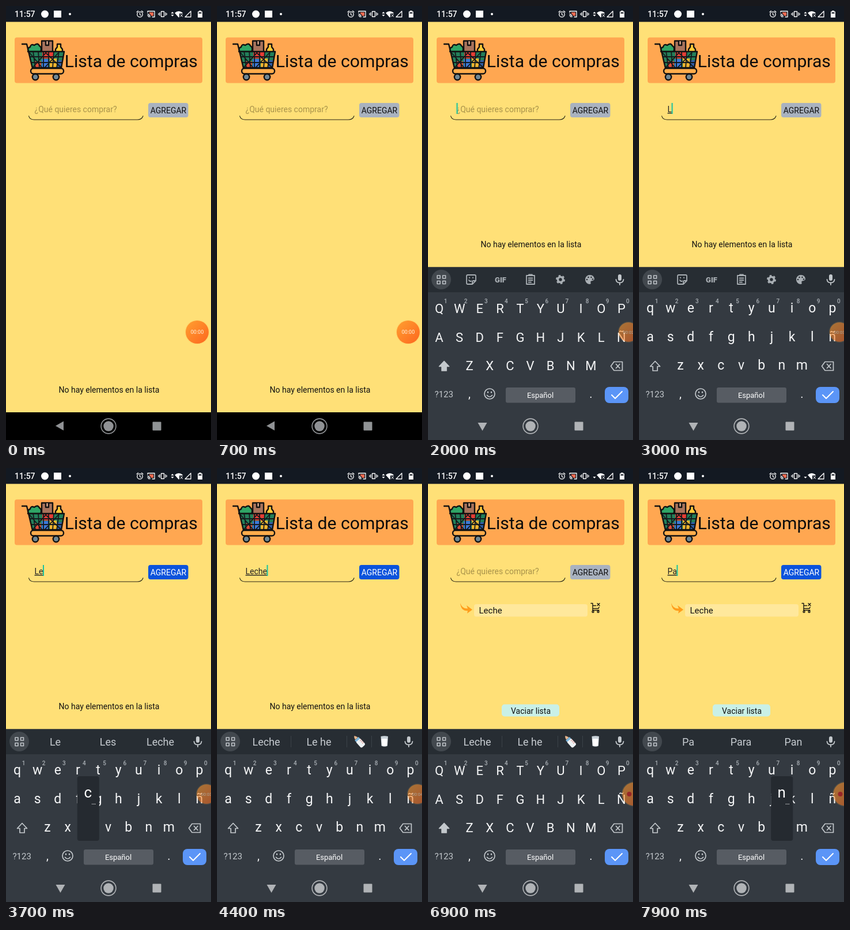
Animation, 356 px wide and 752 px high, one loop 8 s. Source, as an HTML page:

```html
<!DOCTYPE html>
<html lang="es">
<head>
<meta charset="utf-8">
<title>Lista de compras</title>
<style>
html, body { margin: 0; width: 100%; height: 100%; overflow: hidden; background: #ffe077; }
svg { display: block; width: 356px; height: 752px; }
text { font-family: Roboto, Arial, sans-serif; }
.mid { text-anchor: middle; }
.line { fill: none; stroke-linecap: round; stroke-linejoin: round; }
</style>
</head>
<body>
<svg id="stage" viewBox="0 0 356 752" xmlns="http://www.w3.org/2000/svg">
  <defs>
    <linearGradient id="orange" x2="1" y2="1">
      <stop offset="0" stop-color="#ffa030"/><stop offset="1" stop-color="#fd661f"/>
    </linearGradient>
    <clipPath id="basket"><path d="M39 79H101L96 107H46Z"/></clipPath>
  </defs>
  <rect width="356" height="752" fill="#ffe077"/>

  <!-- status bar -->
  <rect width="356" height="27.500" fill="#131922"/>
  <g fill="#fff">
    <text x="15" y="19" font-size="14" font-weight="500">11:57</text>
    <circle cx="67.500" cy="14" r="6.500"/>
    <rect x="83" y="8" width="13" height="12"/>
    <circle cx="111" cy="14" r="2"/>
    <g class="line" stroke="#fff" stroke-width="1.300">
      <circle cx="232.500" cy="14.500" r="4.700"/>
      <path d="M232.500 12V15L234.500 16M227 10.500L229.500 8.500M238 10.500L235.500 8.500"/>
      <path d="M246 11V9H258V19H254M246 14Q250 15 250 19M246 16.500Q248 17 248 19"/>
      <path d="M269.500 9.500H274.500V18.500H269.500ZM267 11.500V16.500M277 11.500V16.500M265 13V15M279 13V15"/>
      <path d="M311 19H321V9Z"/>
    </g>
    <path d="M249 11H256V17H252Q251 14 249 13Z" fill="#f06a50"/>
    <path id="up" d="M286.500 13L289 10L291.500 13Z"/>
    <path d="M286.500 15L289 18L291.500 15Z"/>
    <path d="M293 12Q300 6 307 12L300 20Z"/>
    <path d="M301 13H307V20H301Z" fill="#131922"/>
    <path class="line" d="M303 14.500L306.500 18.500M306.500 14.500L303 18.500" stroke="#fff"/>
    <path d="M335 8H339V9.500H341V20H333V9.500H335Z"/>
    <path d="M334.500 11H339.500V13H334.500Z" fill="#131922"/>
  </g>

  <!-- header -->
  <rect x="15" y="54.500" width="326" height="79" rx="4" fill="#ffa751"/>
  <g stroke="#111" stroke-width="2.400" stroke-linejoin="round">
    <path d="M39 79Q36 73 42 71Q43 65 49 68Q55 63 58 69Q63 72 60 79Z" fill="#2fa566"/>
    <rect x="62" y="60.500" width="19" height="20" fill="#a9735c"/>
    <path d="M69 61V68H74V61" fill="#d9a88c"/>
    <path d="M86 80V75L89 71V66H95V71L98 75V80Z" fill="#ffcb38"/>
    <g clip-path="url(#basket)" stroke-width="0">
      <rect x="38" y="78" width="64" height="30" fill="#237f5a"/>
      <path d="M63 78H82V91H63Z" fill="#e53d35"/>
      <path d="M62 92H75V108H62Z" fill="#3d78d8"/>
      <path d="M76 91H88V108H76Z" fill="#efb430"/>
      <path d="M50 96H61V108H50Z" fill="#df4c39"/>
      <path d="M88 94H100V108H88Z" fill="#315fa8"/>
      <path d="M38 88H102M40 98H100M47 78L51 108M56 78L58 108M65 78V108M74 78V108M83 78L81 108M92 78L88 108M45 108L72 78M66 108L92 80M40 80L62 106M68 80L96 107" fill="none" stroke="#141a1c" stroke-width="1.800"/>
    </g>
    <path class="line" d="M28 66H36L46 108M38 79H101L96 107H46"/>
    <rect x="43" y="108" width="57" height="9.500" rx="4.500" fill="#ffad4c"/>
    <circle cx="51" cy="123" r="5.200" fill="#6f8794"/>
    <circle cx="87" cy="123" r="5.200" fill="#6f8794"/>
  </g>
  <text x="101.700" y="106" font-size="30.150" fill="#0b0b0b">Lista de compras</text>

  <!-- form -->
  <path class="line" d="M39.500 190.500Q41 197 49 197H228Q236 197 238 190.500" stroke="#2a2616" stroke-width="1.100"/>
  <text id="hint" x="49.500" y="184" font-size="14" fill="#a8924a">¿Qué quieres comprar?</text>
  <text id="input" x="49.500" y="184" font-size="14" fill="#222" text-decoration="underline"></text>
  <rect id="caret" y="168" width="2" height="19" fill="#19c2a0"/>
  <rect id="add" x="247" y="168" width="69.500" height="25" rx="4"/>
  <text id="addText" class="mid" x="282" y="186" font-size="14">AGREGAR</text>

  <!-- list -->
  <text id="empty" class="mid" x="179" font-size="14" fill="#111">No hay elementos en la lista</text>
  <g id="list">
    <rect x="80" y="236" width="197" height="21.500" rx="4" fill="#ffe89c"/>
    <text x="88.500" y="251.500" font-size="15" fill="#111">Leche</text>
    <path d="M56 234Q59 244 69 243.500L67 238L77 245.500L68 252L69 247.500Q57 248 56 234Z" fill="#ff9d1c"/>
    <g class="line" stroke="#1c1a12" stroke-width="1.400">
      <path d="M283 234.500H286V246.500H297M286 238.500H291.500M286.500 243.500H296L297 241M294 234.500L298 238.500M298 234.500L294 238.500"/>
      <circle cx="286.500" cy="249" r="1.500"/><circle cx="295.500" cy="249" r="1.500"/>
    </g>
    <rect x="128" y="409.500" width="100" height="21" rx="5" fill="#c9f0e7"/>
    <text class="mid" x="178.500" y="425.500" font-size="14" fill="#111">Vaciar lista</text>
  </g>

  <!-- keyboard -->
  <g id="board">
    <rect y="452.500" width="356" height="300" fill="#343a41"/>
    <rect y="452.500" width="356" height="43.500" fill="#272d33"/>
    <circle cx="23" cy="474" r="17" fill="#42484e"/>
    <g class="line" stroke="#bfc4c9" stroke-width="1.600">
      <path d="M16 467H21V472H16ZM25.500 467H30.500V472H25.500ZM16 476.500H21V481.500H16ZM25.500 476.500H30.500V481.500H25.500Z"/>
    </g>
    <g id="tools">
      <g class="line" stroke="#a9afb4" stroke-width="1.800">
        <path d="M69 466H81Q83 466 83 468V476L77 482H69Q67 482 67 480V468Q67 466 69 466ZM83 476H79Q77 476 77 478V482M71 475Q73 478 75 476.500M72 470.500V471M78 470.500V471"/>
        <path d="M171 467H185V482H171ZM175 467V465.500H181V467M174.500 471.500H181.500M174.500 475H181.500M174.500 478.500H179"/>
        <circle cx="230" cy="474" r="4.500" stroke-width="3.600"/>
        <circle cx="230" cy="474" r="6.600" stroke-width="2.800" stroke-linecap="butt" stroke-dasharray="3.456"/>
      </g>
      <text class="mid" x="126" y="479" font-size="13" font-weight="900" fill="#a9afb4">GIF</text>
      <path d="M281 466A8 8 0 1 0 281 482Q284 481 282 478Q283 476 286 476Q289 475 289 473Q288 466 281 466Z" fill="#a9afb4"/>
      <g fill="#272d33"><circle cx="276" cy="474" r="1.300"/><circle cx="278.500" cy="470" r="1.300"/><circle cx="283.500" cy="470" r="1.300"/><circle cx="286" cy="473.500" r="1.300"/></g>
    </g>
    <g id="words" font-size="18" fill="#c6cbd0">
      <text class="mid" x="85.500" y="481"></text><text class="mid" x="177" y="481"></text><text class="mid" x="268" y="481"></text>
    </g>
    <g id="milk">
      <path d="M128.500 464V484M225.500 464V484M268.500 464V484" stroke="#3b4248"/>
      <g transform="rotate(-42 247 474)">
        <rect x="242" y="470" width="10" height="15" rx="3" fill="#eef3f5"/>
        <rect x="242.500" y="467" width="9" height="4" rx="1" fill="#7fb7dc"/>
        <path d="M244 467Q245 462 247 461Q249 462 250 467Z" fill="#e5b48c"/>
        <path d="M248.500 474H252M248.500 477H252M248.500 480H252" stroke="#e08a80"/>
      </g>
      <path d="M284.500 465Q291 463.500 297 465L296 481.500Q291 484 285.500 481.500Z" fill="#c9d2d8"/>
      <path d="M285.500 469H296L295.200 481Q291 482.500 286.300 481Z" fill="#fff"/>
    </g>
    <g fill="#c3c8cc">
      <rect x="330" y="465" width="6" height="11" rx="3"/>
      <path class="line" d="M326.500 474Q327 479.500 333 479.500Q339 479.500 339.500 474M333 480V483" stroke="#c3c8cc" stroke-width="1.800"/>
    </g>
    <g id="keys" text-anchor="middle"></g>
    <path id="shift" class="line" d="M28 615.500L19.500 624.500H24V632H32V624.500H36.500Z" stroke="#c3c8cc" stroke-width="1.700"/>
    <g class="line" stroke="#c3c8cc" stroke-width="1.700">
      <path d="M323 616.500H337.500V631.500H323L317.500 624ZM326.500 620.500L333 627.500M333 620.500L326.500 627.500"/>
      <circle cx="107" cy="672" r="9"/><path d="M102.500 674.500Q107 680 111.500 674.500"/>
      <path d="M104 669V669.500M110 669V669.500" stroke-width="2.400"/>
    </g>
    <text x="11.500" y="677.500" font-size="15" fill="#c3c8cc">?123</text>
    <text class="mid" x="72" y="679" font-size="20" fill="#f4f5f6">,</text>
    <text class="mid" x="283" y="679" font-size="20" fill="#f4f5f6">.</text>
    <rect x="135" y="661" width="121" height="26.500" rx="3" fill="#575c63"/>
    <text class="mid" x="195" y="679" font-size="13" fill="#fff">Español</text>
    <rect x="307" y="660" width="41" height="28" rx="8" fill="#5b95f7"/>
    <path class="line" d="M319 674L325 680L337 668" stroke="#fff" stroke-width="2"/>
    <g id="popup">
      <rect x="-18.500" y="-90" width="38" height="112" rx="4" fill="#252a30"/>
      <text id="popChar" class="mid" y="-53" font-size="26" fill="#fff"></text>
      <text class="mid" x="10" y="-41" font-size="12" fill="#fff">…</text>
    </g>
  </g>

  <!-- navigation -->
  <rect id="navBack" y="704" width="356" height="48"/>
  <g id="nav" fill="#b0b3b6">
    <path id="back" d="M86 727.500L100 719.500V735.500Z"/>
    <circle cx="178" cy="728" r="8.700"/>
    <circle cx="178" cy="728" r="12.900" fill="none" stroke="#b0b3b6" stroke-width="1.600"/>
    <rect x="254.500" y="720.500" width="15" height="15" rx="1"/>
  </g>

  <!-- recorder bubble -->
  <g id="bubble">
    <circle r="21.500" fill="#ffc45c" opacity=".25"/>
    <circle r="20" fill="url(#orange)"/>
    <text id="clock" class="mid" y="3" font-size="9" fill="#fff3e0"></text>
    <circle id="dot" cx="-8" r="4" fill="#e01818"/>
  </g>
</svg>
<script>
const LOOP = 8000, LAG = 90, PRESS = 120;
const $ = id => document.getElementById(id);
const set = (id, attrs) => { for (const k in attrs) $(id).setAttribute(k, attrs[k]); };
const show = (id, on) => set(id, { visibility: on ? 'visible' : 'hidden' });
const ramp = (t, from, length) => Math.min(1, Math.max(0, (t - from) / length));
const mix = (a, b, k) => a + (b - a) * k;

// Field contents from each moment on
const typing = [[0, ''], [2950, 'L'], [3400, 'Le'], [3800, 'Lec'], [4050, 'Lech'], [4300, 'Leche'],
  [5400, ''], [7100, 'P'], [7600, 'Pa'], [8000, 'Pan']];
const guesses = {
  L: ['L', 'La', 'Los'], Le: ['Le', 'Les', 'Leche'], Lec: ['Lec', 'Leche', 'Lectura'],
  Lech: ['Lech', 'Leche', 'Lechuga'], Leche: ['Leche', 'Le he', ''],
  P: ['P', 'Para', 'Por'], Pa: ['Pa', 'Para', 'Pan']
};
const stepAt = t => typing.findLastIndex(step => step[0] <= t);

const keys = {};
function addText(attrs, text) {
  const el = document.createElementNS('http://www.w3.org/2000/svg', 'text');
  for (const k in attrs) el.setAttribute(k, attrs[k]);
  el.textContent = text;
  return $('keys').appendChild(el);
}
['qwertyuiop', 'asdfghjklñ', 'zxcvbnm'].forEach((row, r) => [...row].forEach((char, i) => {
  const x = (r < 2 ? 19.5 : 72) + i * 35.15, y = [532, 581.5, 631][r];
  keys[char] = { x, y, el: addText({ x, fill: '#f4f5f6' }, char) };
  if (!r) addText({ x: x + 11, y: 514.5, 'font-size': 10, 'font-weight': 500, fill: '#a9afb4' }, (i + 1) % 10);
}));

function drawField(t, step) {
  const text = typing[step][1];
  const late = Math.max(0, stepAt(t - LAG));
  const filled = typing[late][1] !== '';
  $('input').textContent = text;
  show('hint', !text);
  const since = t - (step ? typing[step][0] : 1700);
  show('caret', since >= 0 && Math.floor(since / 500) % 2 === 0);
  set('caret', { x: 49.5 + (text ? $('input').getComputedTextLength() - 0.5 : 0) });
  set('add', { fill: filled ? '#0b53dc' : '#a9b2bf' });
  set('addText', { fill: filled ? '#fff' : '#111' });

  const word = typing[late][1] || (late ? 'Leche' : '');
  show('tools', !word);
  show('milk', word === 'Leche');
  [...$('words').children].forEach((el, i) => el.textContent = word ? guesses[word][i] : '');
}

function drawKeys(t, step) {
  const upper = t < 2950 || (t >= 6400 && t < 7100);
  for (const char in keys) {
    const { y, el } = keys[char];
    el.textContent = upper ? char.toUpperCase() : char;
    el.setAttribute('y', upper ? y : y - 1);
    el.setAttribute('font-size', upper ? 22 : 23);
  }
  set('shift', { style: `fill:${upper ? '#c3c8cc' : 'none'}` });

  const next = typing[step + 1];
  const pressed = next && next[1] && t >= next[0] - PRESS;
  show('popup', pressed);
  if (pressed) {
    const char = next[1].at(-1), key = keys[char.toLowerCase()];
    $('popChar').textContent = char;
    set('popup', { transform: `translate(${key.x} ${key.y - 7})` });
  }
}

function drawBubble(t) {
  const dock = ramp(t, 1300, 300), tuck = ramp(t, 5200, 300);
  const x = mix(mix(332, 348, dock), 357.5, tuck);
  const scale = mix(mix(1, 0.84, dock), 1, tuck);
  set('bubble', { transform: `translate(${x} 565) scale(${scale})`, opacity: mix(1, 0.58, dock) });
  $('clock').textContent = '00:0' + Math.floor(t / 1000);
  show('clock', tuck < 0.5);
  show('dot', tuck >= 0.5);
}

function draw(t) {
  const step = stepAt(t), added = t >= 5400;
  const open = 1 - (1 - ramp(t, 1800, 190)) ** 2;
  drawField(t, step);
  drawKeys(t, step);
  drawBubble(t);
  show('up', t < 5300);
  show('list', added);
  show('empty', !added);
  set('empty', { y: t < 1850 ? 670 : 418 });
  set('board', { transform: `translate(0 ${300 * (1 - open)})` });
  set('navBack', { opacity: 1 - open });
  set('nav', { opacity: mix(0.82, 1, open) });
  set('back', { transform: `rotate(${-90 * ramp(t, 1700, 300)} 94.500 727.500)` });
}

const start = performance.now();
function frame() {
  draw((performance.now() - start) % LOOP);
  requestAnimationFrame(frame);
}
frame();
</script>
</body>
</html>
```
